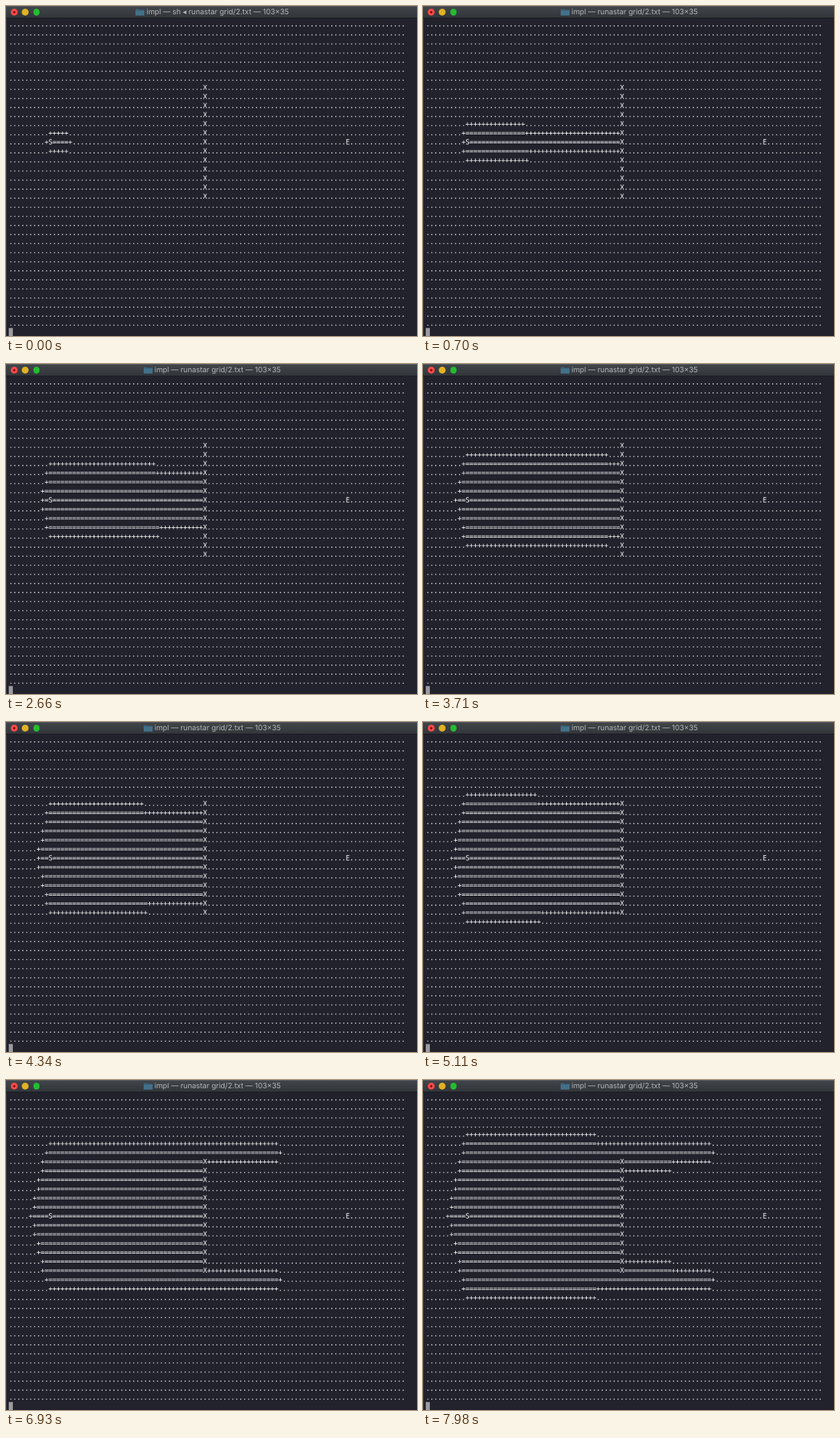
An HTML page with a canvas for the animation above (8000 ms loop, 600x481 px).

```html
<!DOCTYPE html>
<html lang="en">
<head>
<meta charset="utf-8">
<title>Path search in a terminal</title>
<style>
  html, body { margin: 0; width: 100%; height: 100%; overflow: hidden; background: #22222d; }
  #window { position: relative; width: 600px; height: 481px; overflow: hidden; background: #22222d; }
  #bar {
    position: absolute; inset: 0 0 auto 0; height: 18px; box-sizing: border-box;
    background: linear-gradient(#5a5e63 1px, #40454a 1px, #32363b);
    border-bottom: 1px solid #191a20;
  }
  .light { position: absolute; top: 4.2px; width: 9.9px; height: 9.9px; border-radius: 50%; }
  .close { left: 6.7px; background: radial-gradient(circle, #7c0d10 1.3px, #fc4a48 2px); }
  .min { left: 23.1px; background: #e0b224; }
  .max { left: 39.6px; background: #24bc30; }
  #caption {
    position: absolute; inset: 0 0 0 2px; display: flex; align-items: center; justify-content: center;
    gap: 3px; font: 10.75px/18px Inter, "DejaVu Sans", sans-serif; color: #b5b8ba; white-space: pre;
    text-rendering: geometricPrecision;
  }
  #caption svg { flex: none; }
  canvas { position: absolute; left: 0; top: 0; }
</style>
</head>
<body>
<div id="window">
  <canvas id="screen" width="600" height="481"></canvas>
  <div id="bar">
    <i class="light close"></i><i class="light min"></i><i class="light max"></i>
    <div id="caption">
      <svg width="13" height="10" viewBox="0 0 13 10">
        <path d="M0 1.2Q0 .4 .8 .4H4.4L5.6 1.5H12.2Q13 1.5 13 2.3V9Q13 9.8 12.2 9.8H.8Q0 9.8 0 9Z" fill="#38637a"/>
        <path d="M0 3H13V9Q13 9.8 12.2 9.8H.8Q0 9.8 0 9Z" fill="#437088"/>
      </svg>
      <span id="title"></span>
    </div>
  </div>
</div>
<script>
const LOOP = 8000, STEP = 70, TITLE_SWITCH = 350;
const COLS = 100, ROWS = 34;
const START = { x: 10, y: 13 }, GOAL = { x: 85, y: 13 };
const FIRST_COUNT = 5, CELLS_PER_STEP = 6.526;

// The terminal is drawn at its own large size, then scaled down to the stage.
const WIDTH = 1452, HEIGHT = 1164;
const CELL_W = 14, CELL_H = 32, LEFT = 10, TOP = 44, BASELINE = 28;

const isWall = (x, y) => x === 49 && y >= 7 && y <= 19;
const key = (x, y) => y * COLS + x;
const neighbours = ({ x, y }) => [[1, 0], [-1, 0], [0, 1], [0, -1]]
  .map(([dx, dy]) => ({ x: x + dx, y: y + dy }))
  .filter(c => c.x >= 0 && c.x < COLS && c.y >= 0 && c.y < ROWS && !isWall(c.x, c.y));

// A* with straight-line distance; equal costs go to the lower row first.
function searchOrder(limit) {
  const order = [], open = [], seen = new Set();
  const push = (cell, g) => {
    seen.add(key(cell.x, cell.y));
    open.push({ ...cell, g, f: g + Math.sqrt((GOAL.x - cell.x) ** 2 + (GOAL.y - cell.y) ** 2) });
  };
  const before = (a, b) => Math.abs(a.f - b.f) > 1e-9 ? a.f < b.f : a.y > b.y;
  push(START, 0);
  while (order.length < limit) {
    let best = 0;
    for (let i = 1; i < open.length; i++) if (before(open[i], open[best])) best = i;
    const [cell] = open.splice(best, 1);
    order.push(cell);
    for (const next of neighbours(cell)) {
      if (!seen.has(key(next.x, next.y))) push(next, cell.g + 1);
    }
  }
  return order;
}

const countAt = step => Math.round(FIRST_COUNT + CELLS_PER_STEP * step);
const order = searchOrder(countAt(Math.floor(LOOP / STEP)));
const title = document.getElementById("title");
const ctx = document.getElementById("screen").getContext("2d");
ctx.imageSmoothingQuality = "high";

const buffer = document.createElement("canvas");
buffer.width = WIDTH;
buffer.height = HEIGHT;
const pen = buffer.getContext("2d");
pen.font = '24px "DejaVu Sans Mono", monospace';

function gridAt(count) {
  const grid = Array.from({ length: ROWS * COLS }, (_, i) =>
    isWall(i % COLS, Math.floor(i / COLS)) ? "X" : ".");
  const visited = order.slice(0, count);
  for (const cell of visited) for (const n of neighbours(cell)) grid[key(n.x, n.y)] = "+";
  for (const cell of visited) grid[key(cell.x, cell.y)] = "=";
  grid[key(START.x, START.y)] = "S";
  grid[key(GOAL.x, GOAL.y)] = "E";
  return grid;
}

function drawScreen(step) {
  pen.fillStyle = "#22222d";
  pen.fillRect(0, 0, WIDTH, HEIGHT);
  pen.fillStyle = "#3a3c45";
  pen.fillRect(0, 0, 2, HEIGHT);
  pen.fillStyle = "#9b9b9f";
  pen.fillRect(LEFT, TOP + ROWS * CELL_H + 4, CELL_W, CELL_H - 4);
  pen.fillStyle = "#fff";
  gridAt(countAt(step)).forEach((char, i) => {
    const x = LEFT + (i % COLS) * CELL_W;
    const y = TOP + Math.floor(i / COLS) * CELL_H + BASELINE;
    pen.fillText(char, x, y);
  });
  ctx.drawImage(buffer, 0, 0, 600, 481);
}

const began = performance.now();
let shown = -1;
function tick() {
  const time = (performance.now() - began) % LOOP;
  const step = Math.floor(time / STEP);
  if (step !== shown) {
    shown = step;
    drawScreen(step);
    const shell = time < TITLE_SWITCH ? "sh ◂ " : "";
    title.textContent = `impl — ${shell}runastar grid/2.txt — 103×35`;
  }
  requestAnimationFrame(tick);
}
tick();
</script>
</body>
</html>
```
